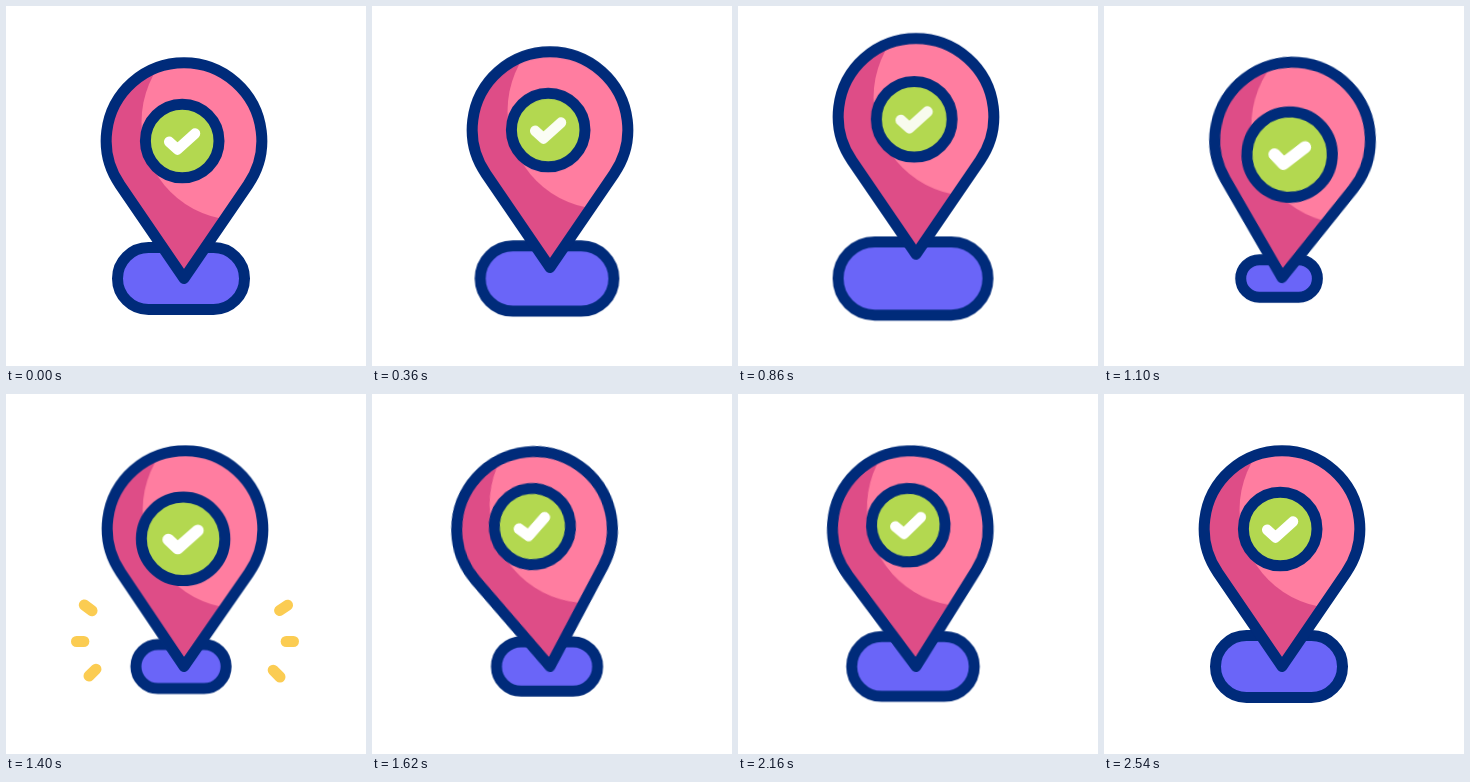
An HTML page that plays this animation: 360x360 px, repeating every 3000 ms.

```html
<!DOCTYPE html>
<html lang="en">
<head>
<meta charset="utf-8">
<title>Location pin</title>
<style>
  html, body { margin: 0; width: 100%; height: 100%; overflow: hidden; background: #fff; }
  svg { display: block; width: 100vw; height: 100vh; }

  .line { stroke: #002b7a; stroke-width: 11; stroke-linejoin: round; vector-effect: non-scaling-stroke; }
  .base, .lift, .tilt, .badge, .check, .rays path {
    animation: 3s cubic-bezier(.37, 0, .63, 1) infinite;
  }
  .base  { animation-name: base;  transform-origin: 175px 272.5px; }
  .lift  { animation-name: lift; }
  .tilt  { animation-name: tilt;  transform-origin: 178px 272.5px; }
  .badge { animation-name: badge; transform-origin: 176.2px 135px; }
  .check { animation-name: check; }
  .rays path { animation-name: ray; animation-timing-function: linear; opacity: 0; }

  @keyframes base {
    0%, 6.67% { transform: scale(1); }
    25.9% { transform: scale(1.295); }
    36.33% { transform: scale(.6); animation-timing-function: cubic-bezier(.39, .45, .6, 1); }
    84.67%, 100% { transform: scale(1); }
  }
  @keyframes lift {
    0%, 6.67% { transform: translateY(0); }
    21.67% { transform: translateY(-39px); }
    38.33%, 100% { transform: translateY(0); }
  }
  @keyframes tilt {
    0%, 35% { transform: rotate(0deg); }
    38.07% { transform: rotate(7.5deg); }
    43.8% { transform: rotate(-7.5deg); }
    49.4% { transform: rotate(7.5deg); }
    55% { transform: rotate(-7.5deg); }
    60.6% { transform: rotate(7.5deg); }
    66% { transform: rotate(-7deg); }
    76%, 100% { transform: rotate(0deg); }
  }
  @keyframes badge {
    0%, 24.67% { transform: translateY(0) scale(1); }
    40% { transform: translateY(16px) scale(1.18); }
    60% { transform: translateY(-8.5px) scale(1); }
    83.33%, 100% { transform: translateY(0) scale(1); }
  }
  @keyframes check {
    0%, 6.67% { opacity: 1; }
    22% { opacity: .8; }
    35%, 54% { opacity: 1; }
    61% { opacity: .93; }
    69%, 100% { opacity: 1; }
  }
  @keyframes ray {
    0%, 38.32% { opacity: 0; stroke-dasharray: .1 300; stroke-dashoffset: 0; }
    38.33% { opacity: 1; stroke-dasharray: .1 300; stroke-dashoffset: 0; }
    42.67% { opacity: 1; stroke-dasharray: 60 300; stroke-dashoffset: -26; }
    46.67% { opacity: 1; stroke-dasharray: 37 300; stroke-dashoffset: -63; }
    50.32% { opacity: 1; stroke-dasharray: .1 300; stroke-dashoffset: -99.8; }
    50.33%, 100% { opacity: 0; stroke-dasharray: .1 300; stroke-dashoffset: -99.8; }
  }
</style>
</head>
<body>
<svg viewBox="0 0 360 360">
  <defs>
    <path id="pin" d="M178 272.5L114 178.8A77.8 77.8 0 1 1 242 178.8Z"/>
    <clipPath id="inside"><use href="#pin"/></clipPath>
  </defs>

  <g class="rays" fill="none" stroke="#fbcc52" stroke-width="11" stroke-linecap="round">
    <path pathLength="100" d="M99.3 226.6L78.3 211"/>
    <path pathLength="100" d="M90.5 247.5H70.5"/>
    <path pathLength="100" d="M102 263.3L83 282"/>
    <path pathLength="100" d="M260 225.7L281.5 211.2"/>
    <path pathLength="100" d="M267.5 247.5H287.5"/>
    <path pathLength="100" d="M255.4 264.3L274 283"/>
  </g>

  <rect class="base line" x="111.5" y="241.5" width="127" height="62" rx="31" fill="#6a65f8"/>

  <g class="lift">
    <g class="tilt">
      <use href="#pin" fill="#de4d87"/>
      <circle cx="234" cy="116" r="98.5" fill="#ff7da0" clip-path="url(#inside)"/>
      <use href="#pin" class="line" fill="none"/>
      <g class="badge">
        <circle class="line" cx="176.2" cy="135" r="36.8" fill="#b3d850"/>
        <path class="check" d="M163.2 135.8L171.5 143.4L189 127.6" fill="none" stroke="#fff"
              stroke-width="10.5" stroke-linecap="round" stroke-linejoin="round"/>
      </g>
    </g>
  </g>
</svg>
</body>
</html>
```
